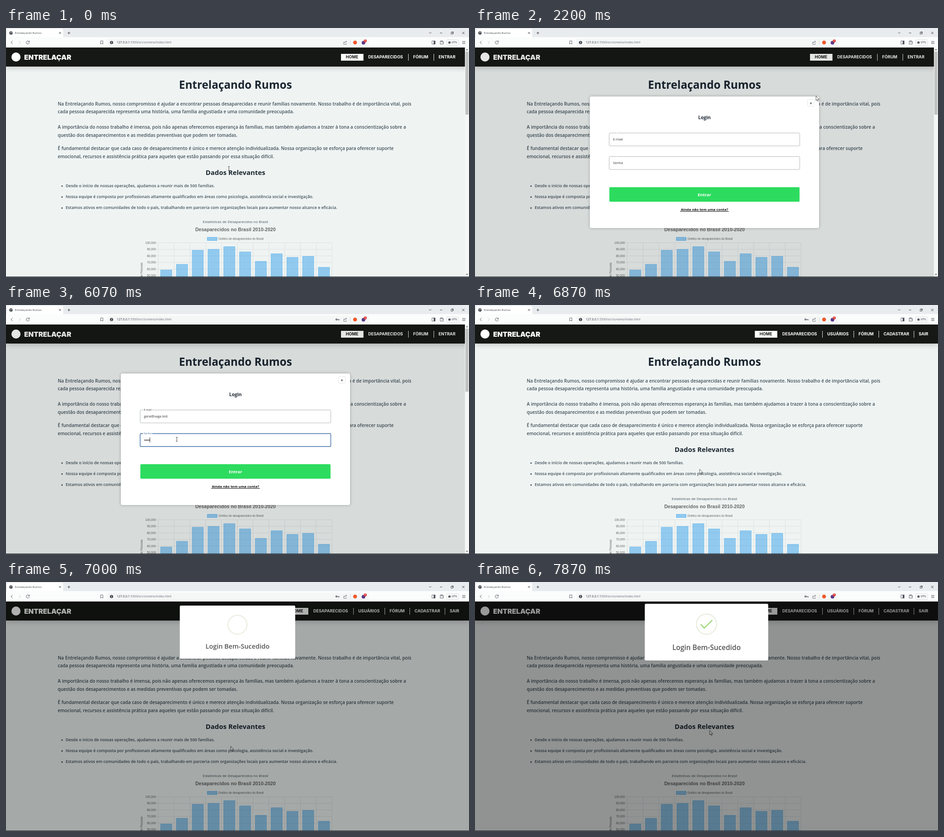
These frames come from a looping animation (1020x549 px, 8000 ms). An HTML page with a canvas:

```html
<!DOCTYPE html>
<html lang="pt">
<head>
<meta charset="utf-8">
<title>Entrelaçando Rumos</title>
<style>
html, body { margin: 0; height: 100%; overflow: hidden; }
canvas { display: block; }
</style>
</head>
<body>
<canvas id="stage" width="1020" height="549"></canvas>
<script>
const c = document.getElementById('stage').getContext('2d');
const LOOP = 8000;
const SANS = '"Open Sans", sans-serif', CAPS = 'Inter, sans-serif', ARIAL = '"Liberation Sans", sans-serif';
const INK = '#414f58', DARK = '#1b2631', BLUE = '#3b6ea8';

const clamp = v => Math.max(0, Math.min(1, v));
const smooth = v => v * v * (3 - 2 * v);
const ramp = (t, start, length) => smooth(clamp((t - start) / length));
const mix = (a, b, k) => a + (b - a) * k;

function text(s, x, y, size, color = INK, weight = 600, font = SANS, align = 'left') {
  c.font = `${weight} ${size}px ${font}`;
  c.fillStyle = color;
  c.textAlign = align;
  c.fillText(s, x, y);
}
function rect(x, y, w, h, color) {
  c.fillStyle = color;
  c.fillRect(x, y, w, h);
}
function box(x, y, w, h, r, fill, stroke, width = 1) {
  c.beginPath();
  c.roundRect(x, y, w, h, r);
  paint(fill, stroke, width);
}
function disc(x, y, r, fill, stroke, width) {
  c.beginPath();
  c.arc(x, y, r, 0, 7);
  paint(fill, stroke, width);
}
function path(d, stroke, width = 1, fill) {
  paint(fill, stroke, width, new Path2D(d));
}
function paint(fill, stroke, width = 1, shape) {
  if (fill) { c.fillStyle = fill; shape ? c.fill(shape) : c.fill(); }
  if (stroke) {
    c.strokeStyle = stroke;
    c.lineWidth = width;
    shape ? c.stroke(shape) : c.stroke();
  }
}

function browser(t) {
  const icon = '#555b63';
  rect(0, 0, 1020, 22, '#e9ecef');
  box(2, 2, 124, 24, 4, '#fff');
  rect(0, 20, 1020, 23, '#fbfcfc');
  disc(11, 11, 3.7, '#3f4449');
  path('M9 9l2 1-1 2M12 8l1 2 1 1M10 14l1-1', '#fff', .8);
  text('Entrelaçando Rumos', 19.5, 13, 6.1, '#3a3f45', 400);
  path('M117 8.8l4 4m0-4l-4 4M135.5 11h6m-3-3v6', '#333', .9);
  path('M932 9.5l2.5 2.5 2.5-2.5M956 11h5M1005 8.5l5 5m0-5l-5 5', '#333', .9);
  path('M980.5 9.8h3.7v3.7h-3.7zM982 9.8v-1.3h3.5v3.7h-1.3', '#333', .8);

  path('M14.5 28.5l-3.5 3.5 3.5 3.5', icon, 1);
  path('M28.5 28.5l3.5 3.5-3.5 3.5', '#c0c4c8', 1);
  path('M50.5 29.5a3.5 3.5 0 1 0 1 3M51.5 28v2.7h-2.7', icon, 1);
  path('M208.5 28.5h5v7l-2.5-2-2.5 2z', icon, .9);
  box(223, 23.5, 576, 17, 3, '#f5f7f7');
  disc(232.5, 32, 3.6, '#454a50');
  rect(232, 31.5, 1, 2.5, '#fff');
  rect(232, 29.8, 1, 1, '#fff');
  text('127.0.0.1', 244, 34.3, 6.8, '#2b3036', 400);
  text(':5500/src/screens/index.html', 244 + c.measureText('127.0.0.1').width, 34.3, 6.8, '#666c73', 400);
  if (t >= 4270) {
    disc(728, 32, 1.5, null, icon, 1.3);
    path('M729.5 32h4.5v2M732 32v1.5', icon, 1.2);
  }
  path('M746 31h-2v5h6v-2M746 33q0-3 4-3m-1.5-2l2 2-2 2', icon, .8);
  rect(758, 27, 1, 10, '#d5d8da');
  disc(769, 32, 4.3, '#f0582a');
  disc(787.5, 32.5, 4, '#593a86');
  disc(791.5, 28.5, 3.2, '#e33b35');
  text('1', 791.5, 30.2, 4.5, '#fff', 600, SANS, 'center');
  path('M938.5 28.5h7v7h-7z', icon, .9);
  rect(942, 28, 4, 8, icon);
  path('M956.5 29.5h7v6h-7zM957 28.5h5M961 32h2.5', icon, .9);
  box(970.5, 25.5, 27, 13, 3, '#f8f9f9', '#dfe2e4');
  disc(977, 32, 2.6, icon);
  text('VPN', 981.5, 34.3, 6.3, '#444a50', 400);
  path('M1005 29.5h7m-7 2.5h7m-7 2.5h7', icon, .9);
}

function chart() {
  text('Estatísticas de Desaparecidos no Brasil', 505.5, 430, 8, INK, 400, SANS, 'center');
  text('Desaparecidos no Brasil 2010-2020', 505.5, 448, 10.6, '#666', 700, ARIAL, 'center');
  const blue = 'rgba(54,162,235,.5)', edge = 'rgba(54,162,235,.65)';
  box(443.5, 461.5, 21.5, 7, 0, blue, edge);
  text('Gráfico de desaparecidos do Brasil', 468, 467, 6.4, '#666', 400, ARIAL);
  for (let i = 0; i < 6; i++) {
    const y = 473.5 + 14.5 * i;
    rect(329.5, y - .5, 388.5, 1, '#dde1e1');
    text(i ? `${100 - 10 * i},000` : '100,000', 330, y + 2, 6.4, '#666', 400, ARIAL, 'right');
  }
  for (let i = 0; i < 12; i++) rect(335 + 34.8 * i, 473, 1, 76, '#dde1e1');
  [533.5, 521, 490, 488, 482, 493.7, 514.5, 497.7, 505.7, 503.5, 527.5].forEach((y, i) =>
    box(340.7 + 34.75 * i, y, 24.6, 560 - y, 0, blue, edge, .8));
  c.save();
  c.translate(301, 517);
  c.rotate(-Math.PI / 2);
  text('Quantidade de Pessoas', 0, 0, 6.4, '#666', 400, ARIAL, 'right');
  c.restore();
}

function navigation(t, logged) {
  const items = logged
    ? [['HOME', 627], ['DESAPARECIDOS', 677], ['USUÁRIOS', 776], ['FÓRUM', 845], ['CADASTRAR', 900], ['SAIR', 977.5]]
    : [['HOME', 748.5], ['DESAPARECIDOS', 798], ['FÓRUM', 897], ['ENTRAR', 953]];
  c.shadowColor = 'rgba(0,0,0,.22)';
  c.shadowBlur = 12;
  c.shadowOffsetY = 2;
  rect(0, 43, 1020, 42, '#161815');
  c.shadowColor = 'transparent';
  c.shadowOffsetY = 0;
  disc(22, 64, 10, '#fff');
  text('ENTRELAÇAR', 40, 69.5, 15.2, '#fff', 900, CAPS);
  items.forEach(([label, x], i) => {
    if (!i) rect(x - 10.5, 57, 49.5, 15, '#fff');
    if (i > 1) rect(x - 11, 57, 1, 15, '#e6e6e6');
    text(label, x, 67, 9.05, i ? '#fff' : '#161815', 700, CAPS);
  });
  if (!logged) rect(953, 69, 37 * ramp(t, 1480, 180) * (1 - ramp(t, 1900, 180)), 1, '#fff');
}

function page(t, logged) {
  rect(0, 43, 1020, 506, '#eff4f3');
  text('Entrelaçando Rumos', 505.5, 134, 24.2, DARK, 700, SANS, 'center');
  [
    ['Na Entrelaçando Rumos, nosso compromisso é ajudar a encontrar pessoas desaparecidas e reunir famílias novamente. Nosso trabalho é de importância vital, pois', 170.5],
    ['cada pessoa desaparecida representa uma história, uma família angustiada e uma comunidade preocupada.', 188],
    ['A importância do nosso trabalho é imensa, pois não apenas oferecemos esperança às famílias, mas também ajudamos a trazer à tona a conscientização sobre a', 222],
    ['questão dos desaparecimentos e as medidas preventivas que podem ser tomadas.', 239.5],
    ['É fundamental destacar que cada caso de desaparecimento é único e merece atenção individualizada. Nossa organização se esforça para oferecer suporte', 269],
    ['emocional, recursos e assistência prática para aqueles que estão passando por essa situação difícil.', 286.5]
  ].forEach(([line, y]) => text(line, 114, y, 9.97));
  text('Dados Relevantes', 505.5, 324, 14.9, DARK, 700, SANS, 'center');
  [
    'Desde o início de nossas operações, ajudamos a reunir mais de 500 famílias.',
    'Nossa equipe é composta por profissionais altamente qualificados em áreas como psicologia, assistência social e investigação.',
    'Estamos ativos em comunidades de todo o país, trabalhando em parceria com organizações locais para aumentar nosso alcance e eficácia.'
  ].forEach((line, i) => {
    disc(123.5, 348.5 + 24.2 * i, 1.6, INK);
    text(line, 131.5, 351 + 24.2 * i, 8.97);
  });
  chart();
  navigation(t, logged);
}

function scrollbar() {
  rect(1011, 43, 9, 505, '#f5f6f6');
  rect(1012, 52, 7, 139, '#c1c3c3');
  path('M1013 49l2.5-3 2.5 3z', null, 0, '#777');
  path('M1013 542l2.5 3 2.5-3z', null, 0, '#777');
}

function field(label, y, focused, floating, value, caret) {
  box(295.5, y + .5, 420, 28.5, 2, '#fff', focused ? BLUE : '#b4b8b8', focused ? 1.4 : 1);
  const size = mix(7.6, 6, floating), width = 19 * floating;
  rect(mix(312, 302, floating), y - 1, width + 1, 3, '#fff');
  text(label, mix(304, 303.5, floating), mix(y + 17, y + 2, floating), size, focused ? BLUE : '#333', 400);
  let end = 304;
  if (label == 'E-mail') {
    text(value, 304, y + 17, 7.1, '#333', 400);
    end += c.measureText(value).width;
  } else {
    for (let i = 0; i < value; i++) disc(306 + 3 * i, y + 15, 1.15, '#222');
    end += value * 3 + .5;
  }
  if (focused && caret) rect(end, y + 9, 1, 11, '#222');
}

function loginDialog(t) {
  const shown = ramp(t, 1870, 200) * (1 - ramp(t, 6690, 170));
  if (!shown) return;
  c.globalAlpha = shown;
  rect(0, 43, 1011, 506, 'rgba(0,0,0,.1)');
  c.shadowColor = 'rgba(0,0,0,.25)';
  c.shadowBlur = 6;
  box(253, 151, 505, 290, 4, '#fff');
  c.shadowColor = 'transparent';
  box(732.5, 157.5, 15, 15, 2, '#fff', '#e2e5e5');
  text('x', 740, 167.5, 7.5, '#222', 600, SANS, 'center');
  text('Login', 505.5, 201, 10.2, DARK, 700, SANS, 'center');

  const email = 'geral@vaga.test';
  const typed = email.slice(0, Math.round(email.length * clamp((t - 3500) / 340)));
  const onPassword = t >= 4030;
  const dots = t < 4270 ? 0 : t < 5330 ? 1 : t < 5530 ? 2 : 4;
  const caret = !(t >= 4870 && t < 5330) && !(t >= 6100 && t < 6600);
  field('E-mail', 231, t >= 3400 && !onPassword, ramp(t, 3400, 200), typed, true);
  field('Senha', 283, onPassword, ramp(t, 4030, 200), dots, caret);

  box(296, 351, 419, 32, 2, t > 6400 ? '#29cd58' : '#2ddc5f');
  text('Entrar', 505.5, 370.5, 9.4, '#fff', 700, SANS, 'center');
  text('Ainda não tem uma conta?', 505.5, 403, 7.8, '#111', 700, SANS, 'center');
  rect(452, 404, 107, 1, '#111');
  c.globalAlpha = 1;
}

function successAlert(t) {
  const start = 6940, age = t - start;
  if (age < 0) return;
  rect(0, 43, 1020, 506, `rgba(0,0,0,${.4 * ramp(t, start - 15, 110)})`);
  const p = age / 300;
  const scale = p < .45 ? mix(.7, 1.05, ramp(p, 0, .33)) : p < .8 ? mix(1.05, .95, ramp(p, .45, .35)) : mix(.95, 1, ramp(p, .8, .2));
  c.save();
  c.globalAlpha = clamp(age / 50);
  c.translate(510, 110.5);
  c.scale(scale, scale);
  box(-136, -62.5, 272, 125, 3, '#fff');
  disc(0, -17.5, 22.3, null, '#e8ecdc', 2.2);
  const tip = ramp(t, start + 400, 130), long = ramp(t, start + 500, 150);
  c.lineCap = 'round';
  if (tip) path(`M-12 -16.5l${7 * tip} ${7.5 * tip}`, '#a5dc86', 2.7);
  if (long) path(`M-5 -9l${17 * long} ${-16.5 * long}`, '#a5dc86', 2.7);
  c.lineCap = 'butt';
  text('Login Bem-Sucedido', 0, 39.5, 15.4, '#545454', 600, SANS, 'center');
  c.restore();
}

// Pointer stops: time, x, y
const stops = [
  [0, 491, 310], [380, 491, 310], [1230, 920, 119], [1260, 920, 119], [1660, 963, 66], [1860, 963, 66],
  [2680, 398, 290], [3000, 322, 238], [3480, 322, 238], [3860, 361, 286], [4000, 361, 286], [4200, 376, 296],
  [6060, 376, 296], [6530, 495, 362], [7500, 495, 362], [7870, 517, 327], [LOOP, 517, 327]
];
function pointer(t) {
  const i = stops.findIndex(s => s[0] > t);
  const [a, b] = [stops[i - 1], stops[i]];
  const k = ramp(t, a[0], b[0] - a[0]);
  const beam = t < 900 || (t > 2600 && t < 6250);
  const hand = (t > 1480 && t < 1900) || (t > 6400 && t < 6690);
  c.save();
  c.translate(mix(a[1], b[1], k), mix(a[2], b[2], k));
  if (beam) path('M-2 -4.5h1.5l.5.5.5-.5h1.5M0 -4v8M-2 4.5h1.5l.5-.5.5.5h1.5', '#333', .9);
  else if (hand) path('M-1 0q1-1.5 2 0v3l3.5 1v3l-1 2.5h-4l-3-4 1-1 1.5 1z', '#222', .8, '#fff');
  else path('M0 0v10l2.3-2 1.6 3.6 1.5-.7-1.6-3.4h3.2z', '#333', .8, '#fff');
  c.restore();
}

function draw(now) {
  const t = now % LOOP, logged = t >= 6860;
  page(t, logged);
  loginDialog(t);
  pointer(t);
  successAlert(t);
  if (!logged) scrollbar();
  browser(t);
  rect(0, 548, 1020, 1, '#23282b');
}

const origin = performance.now();
function tick(now) {
  draw(Math.max(0, now - origin));
  requestAnimationFrame(tick);
}
requestAnimationFrame(tick);
</script>
</body>
</html>
```
